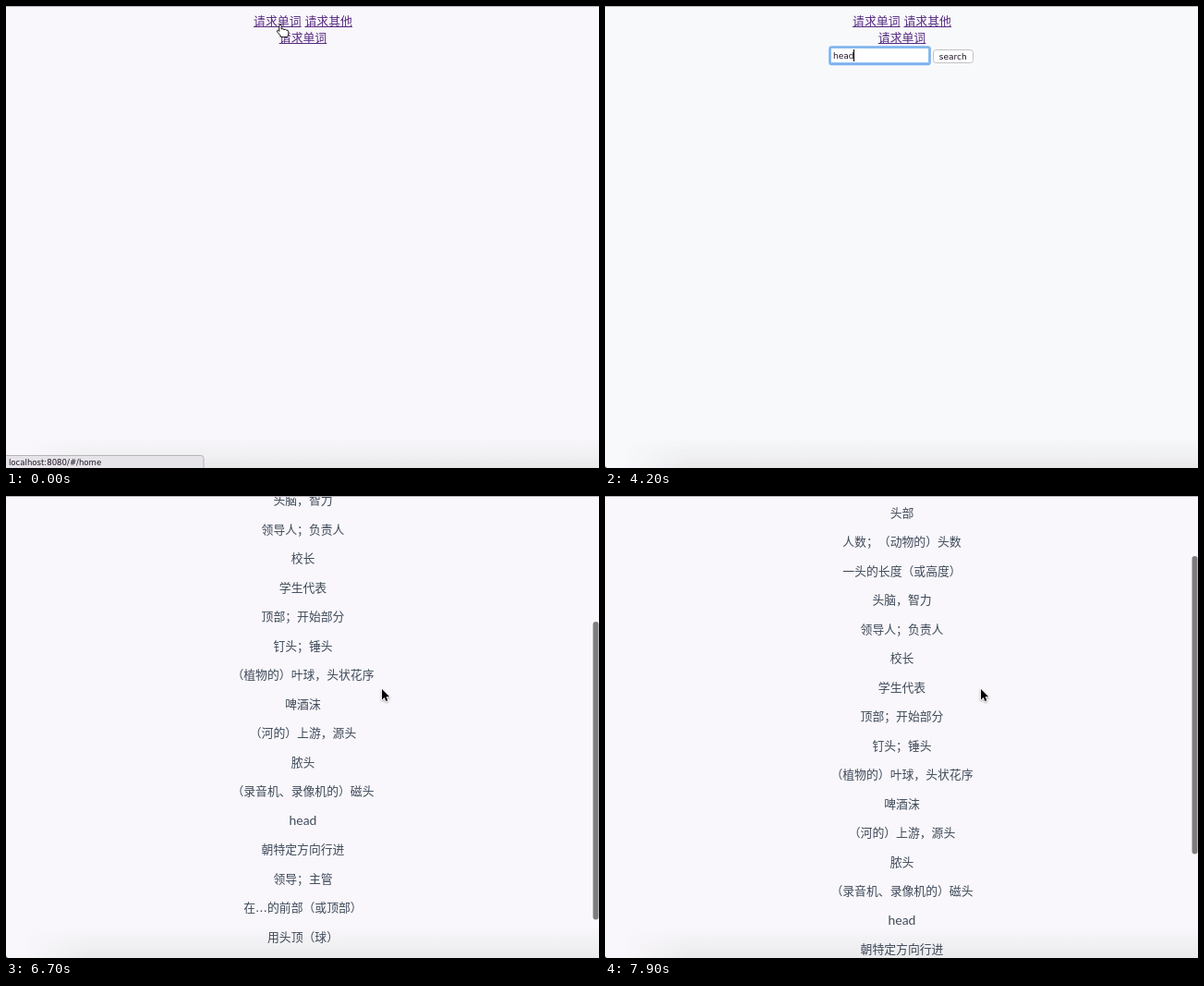
Recreate the animation shown at these times as an HTML page. Size 642 by 500 pixels, loop 8000 ms.

```html
<!DOCTYPE html>
<html lang="zh-CN">
<head>
<meta charset="utf-8">
<title>Word search</title>
<style>
  html, body { margin: 0; width: 100%; height: 100%; overflow: hidden; background: #f9f7fb; }
  svg { display: block; width: 642px; height: 500px; }
  .page {
    font: 12.85px "DejaVu Sans", "Noto Sans CJK SC", "Noto Sans CJK", sans-serif;
    text-spacing-trim: space-all; text-anchor: middle; fill: #3d4959;
  }
  .latin { font: 13.9px Lato, sans-serif; }
  .link { fill: #562a80; }
  .ui { font: 9px "DejaVu Sans", sans-serif; fill: #1c1024; }
  #status text { font-size: 8.56px; }
  #arrow { filter: drop-shadow(0 1px 1px #0005); }
</style>
</head>
<body>
<svg viewBox="0 0 642 500">
  <defs>
    <linearGradient id="shade" x2="0" y2="1">
      <stop offset="0" stop-color="#e9e9eb" stop-opacity="0"/>
      <stop offset="1" stop-color="#e9e9eb"/>
    </linearGradient>
    <linearGradient id="fade">
      <stop offset=".03" stop-color="#000"/>
      <stop offset=".14" stop-color="#fff"/>
    </linearGradient>
    <mask id="left"><rect y="460" width="642" height="40" fill="url(#fade)"/></mask>
  </defs>
  <rect id="bg" width="642" height="500"/>
  <rect y="468" width="642" height="32" fill="url(#shade)" mask="url(#left)"/>
  <path d="M0 497Q0 500 3 500H0Z" fill="#222"/>

  <g id="page" class="page">
    <g id="links"></g>
    <g id="form" class="ui">
      <rect id="ring" x="243.5" y="44.5" width="108" height="18.5" rx="2" fill="none" stroke="#7db2ee" stroke-width="2.6"/>
      <rect id="field" x="244.5" y="45.5" width="106" height="16" fill="#fff" stroke="#c9c8cc"/>
      <text id="word" x="247" y="57" text-anchor="start"></text>
      <rect id="caret" y="47" width="1" height="13" fill="#000"/>
      <rect id="button" x="355.5" y="47.5" width="43" height="14" rx="3" stroke="#c2c1c5"/>
      <text id="label" x="376.8" y="57.5">search</text>
    </g>
    <g id="list"></g>
  </g>

  <rect width="642" height="1" fill="#b7b5ba"/>
  <rect id="thumb" x="635.5" width="6" height="322.5" rx="3" fill="#7d7c7f"/>
  <g id="status" class="ui">
    <path d="M-1 486.5H211Q214 486.5 214 489.5V501H-1Z" fill="#e6e4e8" stroke="#b6b4b9"/>
    <text id="url" x="3" y="497"></text>
  </g>

  <g id="cursor" stroke-linejoin="round">
    <path id="hand" fill="#fff" stroke="#111" d="M-1.2 .8Q0-1 1.2 .8V5Q3.2 4 4 5.6Q6 4.8 6.6 6.2Q8.8 5.8 8.8 7.8V9.6Q8.8 11.8 7.4 13.6H1Q0 11.4-3 8.4Q-4.4 6.6-2.8 6.2Q-2 6.2-1.2 7.4Z"/>
    <path id="beam" fill="none" stroke="#222" d="M-3-5.5Q0-5.5 0-4Q0-5.5 3-5.5M0-4V5M-3 6.5Q0 6.5 0 5Q0 6.5 3 6.5M-1.5 2.5H1.5"/>
    <path id="arrow" fill="#000" stroke="#fff" stroke-width="1.6" paint-order="stroke" d="M0 0V11.5L2.7 9L4.4 13L6.3 12.2L4.6 8.3H8.2Z"/>
  </g>
</svg>
<script>
const LOOP = 8000, STEP = 100, MID = 321.5, PITCH = 31.5, MAX_SCROLL = 270;
const $ = id => document.getElementById(id);

const meanings = [
  'head', '头部', '人数；（动物的）头数', '一头的长度（或高度）', '头脑，智力', '领导人；负责人',
  '校长', '学生代表', '顶部；开始部分', '钉头；锤头', '（植物的）叶球，头状花序', '啤酒沫',
  '（河的）上游，源头', '脓头', '（录音机、录像机的）磁头', 'head', '朝特定方向行进',
  '领导；主管', '在…的前部（或顶部）', '用头顶（球）', '-head', '瘾君子，…迷'
];

// [time, x, y] and [time, offset]
const path = [
  [0, 297, 20], [200, 299, 21], [700, 330, 34], [1000, 332, 35], [1300, 328, 37], [1700, 314, 51],
  [4300, 314, 51], [4800, 376, 54], [5300, 377, 54], [5900, 407, 209]
];
const scroll = [
  [5900, 0], [6100, 46], [6300, 100], [6500, 157], [6700, 206], [6900, 240], [7100, 261],
  [7300, 270], [7500, 270], [7600, 238], [7700, 190], [7800, 141], [7900, 98]
];
const keys = [2700, 2900, 3000, 3200];

function at(table, t) {
  const i = table.findIndex(row => row[0] > t);
  if (i < 0) return table.at(-1).slice(1);
  if (i === 0) return table[0].slice(1);
  const a = table[i - 1], b = table[i], k = (t - a[0]) / (b[0] - a[0]);
  return a.slice(1).map((v, j) => v + (b[j + 1] - v) * k);
}

function add(parent, tag, attrs, text = '') {
  const el = document.createElementNS('http://www.w3.org/2000/svg', tag);
  for (const name in attrs) el.setAttribute(name, attrs[name]);
  el.textContent = text;
  parent.append(el);
}

function link(x, y, text) {
  add($('links'), 'text', { x, y, class: 'link' }, text);
  add($('links'), 'rect', { x: x - 25.8, y: y + 1, width: 51.6, height: 1, class: 'link' });
}

link(293.8, 21, '请求单词');
link(349.2, 21, '请求其他');
link(MID, 39, '请求单词');
meanings.forEach((text, i) => add($('list'), 'text', {
  x: MID, y: 89 + i * PITCH, class: text.endsWith('head') ? 'latin' : ''
}, text));

const show = (id, on) => { $(id).style.display = on ? '' : 'none'; };
const set = (id, name, value) => $(id).setAttribute(name, value);

function draw(t) {
  const focus = t >= 1900 && t < 5000;
  const typed = keys.filter(k => t >= k).length;
  const typing = t >= keys[0] && t < keys[3];
  const blinkFrom = t < keys[0] ? 1900 : keys[3];
  const pressed = t >= 5000 && t < 5200;
  const [y] = at(scroll, t);
  const [cx, cy] = at(path, t);

  set('bg', 'fill', t >= 2600 && t < 5200 ? '#f8f9fb' : '#f9f7fb');
  set('page', 'transform', `translate(0 ${-Math.round(y)})`);
  show('form', t >= 1200);
  show('ring', focus);
  set('field', 'stroke', focus ? '#8fbdf0' : '#c9c8cc');
  $('word').textContent = 'head'.slice(0, typed);
  show('caret', focus && (typing || Math.floor((t - blinkFrom) / 500) % 2 === 0));
  set('caret', 'x', typed ? Math.floor(247 + $('word').getComputedTextLength()) : 247);
  set('button', 'fill', pressed ? '#4a90f0' : '#fff');
  $('label').style.fill = pressed ? '#fff' : '';
  show('list', t >= 5300);

  show('thumb', t > 5900);
  set('thumb', 'y', 178 * y / MAX_SCROLL + .3);

  show('status', t < 2200);
  $('status').style.opacity = Math.min(1, Math.max(0, (2200 - t) / 300));
  $('url').textContent = 'localhost:8080/#/home' + (t < 600 ? '' : '/search');

  const kind = t < 1500 ? 'hand' : t < 4600 ? 'beam' : 'arrow';
  for (const id of ['hand', 'beam', 'arrow']) show(id, id === kind);
  show('cursor', t < keys[0] || t >= 4400);
  set('cursor', 'transform', `translate(${cx} ${cy})`);
}

const start = performance.now();
function tick() {
  const t = (performance.now() - start) % LOOP;
  draw(Math.floor(t / STEP) * STEP);
  requestAnimationFrame(tick);
}
tick();
</script>
</body>
</html>
```
